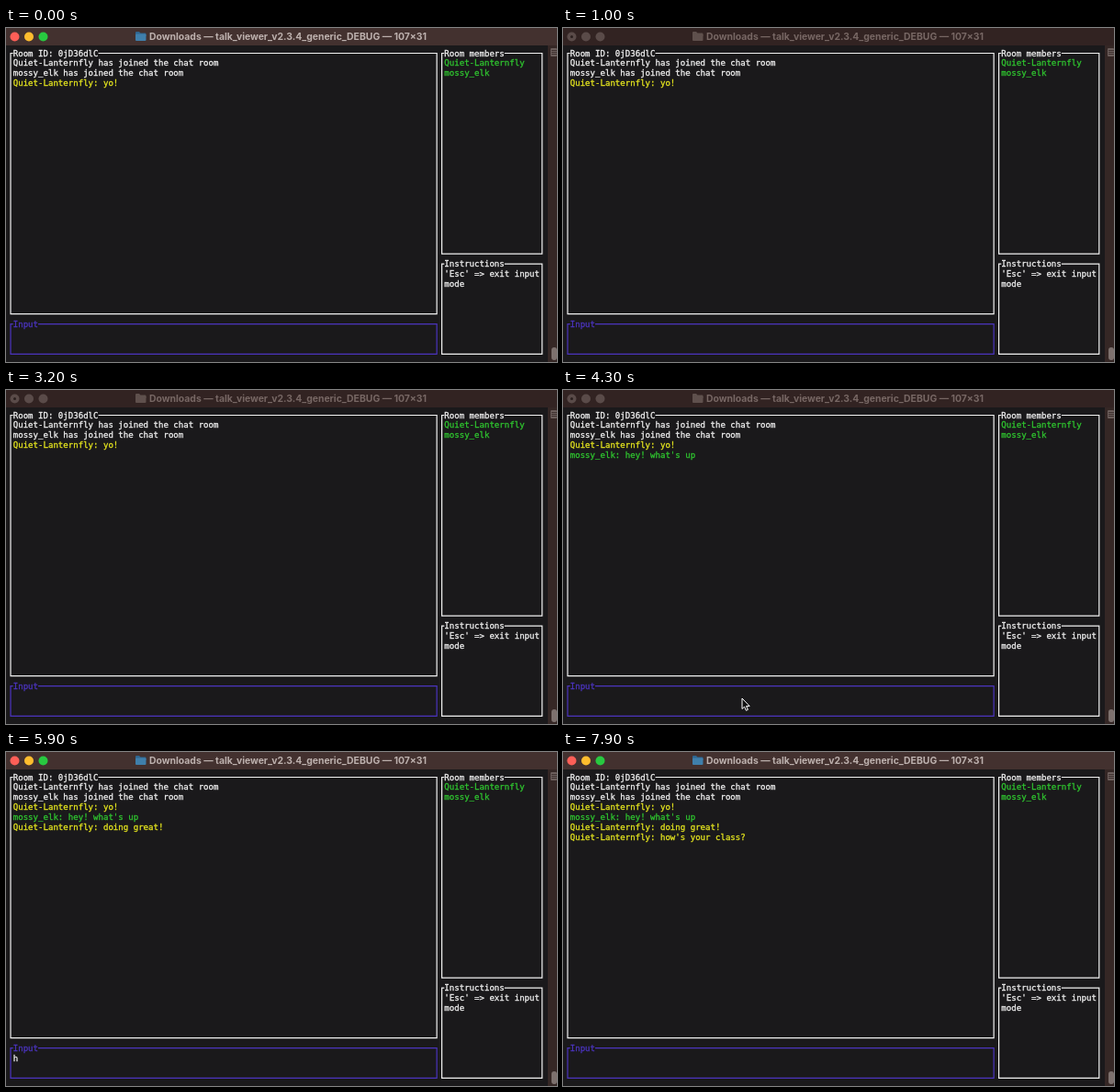
Recreate the animation shown at these times as an HTML page. Size 600x364 px, loop 8 s.

```html
<!DOCTYPE html>
<html>
<head>
<meta charset="utf-8">
<style>
  html, body { margin: 0; width: 100%; height: 100%; overflow: hidden; background: #1a191b; }
  svg { display: block; }
  #screen text { font: 9.07px "DejaVu Sans Mono", monospace; stroke-width: .3px; }
  #title { font: 700 10.4px Inter, sans-serif; }
  .bar { fill: #43312f; }
  .title { fill: #bdb1ae; }
  .folder { fill: #3f7fab; }
  .flap { fill: #2f6690; }
  .red { fill: #ff5f57; }
  .amber { fill: #febc2e; }
  .green { fill: #28c840; }
  .dot { fill: none; }
  .blurred .bar { fill: #322322; }
  .blurred .title { fill: #776764; }
  .blurred .folder, .blurred .flap { fill: #5f504d; }
  .blurred .light { fill: #5a4b49; }
  .blurred .dot { fill: #2a1f1e; }
</style>
</head>
<body>
<svg id="window" width="600" height="364" viewBox="0 0 600 364">
  <rect width="600" height="364" fill="#1a191b"/>
  <rect x="590" y="19" width="10" height="345" fill="#352725"/>
  <rect x="593" y="22" width="7" height="9" rx="1" fill="#6b5e5b"/>
  <path d="M594 24.5H600M594 26.5H600M594 28.5H600" stroke="#3f3230"/>
  <rect x="594" y="348" width="6" height="14" rx="3" fill="#7d716e"/>
  <rect class="bar" width="600" height="19"/>
  <circle class="light red" cx="9.5" cy="9.5" r="5"/>
  <circle class="dot" cx="9.5" cy="9.5" r="1.500"/>
  <circle class="light amber" cx="25" cy="9.5" r="5"/>
  <circle class="light green" cx="40.5" cy="9.5" r="5"/>
  <path class="flap" d="M141 5q0-1 1-1h3l1.500 1.500h5q1 0 1 1V9H141z"/>
  <rect class="folder" x="141" y="6.500" width="11.500" height="7.500" rx="1"/>
  <text id="title" class="title" x="156" y="12.800">Downloads — talk_viewer_v2.3.4_generic_DEBUG — 107×31</text>
  <g id="screen"></g>
  <path id="pointer" d="M0 0V11.500L2.600 9.200L4.400 13.300L6.400 12.400L4.600 8.500H8.200Z" fill="#111" stroke="#fff"/>
</svg>
<script>
const LOOP = 8000, CELL = 5.46, LINE = 10.93;
const WHITE = '#f2f2f2', YELLOW = '#e6e61e', GREEN = '#2fc52f', BLUE = '#4b34be';
const HOST = 'Quiet-Lanternfly', GUEST = 'mossy_elk';
const windowEl = document.getElementById('window');
const screenEl = document.getElementById('screen');
const pointer = document.getElementById('pointer');

const colX = col => 2.3 + col * CELL;
const rowY = row => 27.5 + row * LINE;

function add(tag, attrs, content = '') {
  const el = document.createElementNS(windowEl.namespaceURI, tag);
  for (const name in attrs) el.setAttribute(name, attrs[name]);
  el.textContent = content;
  return screenEl.appendChild(el);
}

const write = (col, row, content, color) =>
  add('text', { x: colX(col), y: rowY(row) + 3, fill: color, stroke: color }, content);

function panel(left, top, right, bottom, label, color) {
  const [x1, x2] = [left, right].map(col => colX(col + 0.5));
  const [y1, y2] = [top, bottom].map(rowY);
  const labelStart = colX(left + 1), labelEnd = colX(left + 1 + label.length);
  add('path', {
    d: `M${labelStart} ${y1}H${x1}V${y2}H${x2}V${y1}H${labelEnd}`,
    fill: 'none', stroke: color, 'stroke-width': 1.2
  });
  write(left + 1, top, label, color);
}

panel(0, 0, 85, 26, 'Room ID: 0jD36dlC', WHITE);
panel(86, 0, 106, 20, 'Room members', WHITE);
panel(86, 21, 106, 30, 'Instructions', WHITE);
panel(0, 27, 85, 30, 'Input', BLUE);
write(87, 1, HOST, GREEN);
write(87, 2, GUEST, GREEN);
write(87, 22, "'Esc' => exit input", WHITE);
write(87, 23, 'mode', WHITE);

const messages = [
  [0, `${HOST} has joined the chat room`, WHITE],
  [0, `${GUEST} has joined the chat room`, WHITE],
  [0, `${HOST}: yo!`, YELLOW],
  [3700, `${GUEST}: hey! what's up`, GREEN],
  [5700, `${HOST}: doing great!`, YELLOW],
  [7700, `${HOST}: how's your class?`, YELLOW]
].map(([time, content, color], i) => ({ time, el: write(1, i + 1, content, color) }));

const input = write(1, 28, '', WHITE);

// Each pair is a time and the number of characters typed by then.
const drafts = [
  { text: 'doing great!', sent: 5700,
    keys: [[4600, 2], [4700, 3], [4800, 5], [4900, 6], [5100, 8], [5200, 9], [5300, 10], [5400, 11], [5500, 12]] },
  { text: "how's your class?", sent: 7700,
    keys: [[5900, 1], [6000, 2], [6200, 3], [6400, 4], [6600, 5], [6900, 6], [7100, 7], [7200, 8],
           [7300, 10], [7400, 12], [7500, 14], [7600, 17]] }
];

function typedAt(t) {
  const draft = drafts.find(d => t >= d.keys[0][0] && t < d.sent);
  if (!draft) return '';
  const [, count] = draft.keys.filter(([time]) => time <= t).pop();
  return draft.text.slice(0, count);
}

function render(t) {
  windowEl.classList.toggle('blurred', t >= 500 && t < 4400);
  for (const { time, el } of messages) el.style.display = t >= time ? '' : 'none';
  input.textContent = typedAt(t);

  const left = 1 - Math.min(1, Math.max(0, (t - 3900) / 400));
  const ease = left * left;
  pointer.style.display = t >= 3900 && t < 4400 ? '' : 'none';
  pointer.setAttribute('transform', `translate(${195 + 405 * ease} ${336 - 40 * ease})`);
}

function tick() {
  render(performance.now() % LOOP);
  requestAnimationFrame(tick);
}
tick();
</script>
</body>
</html>
```
